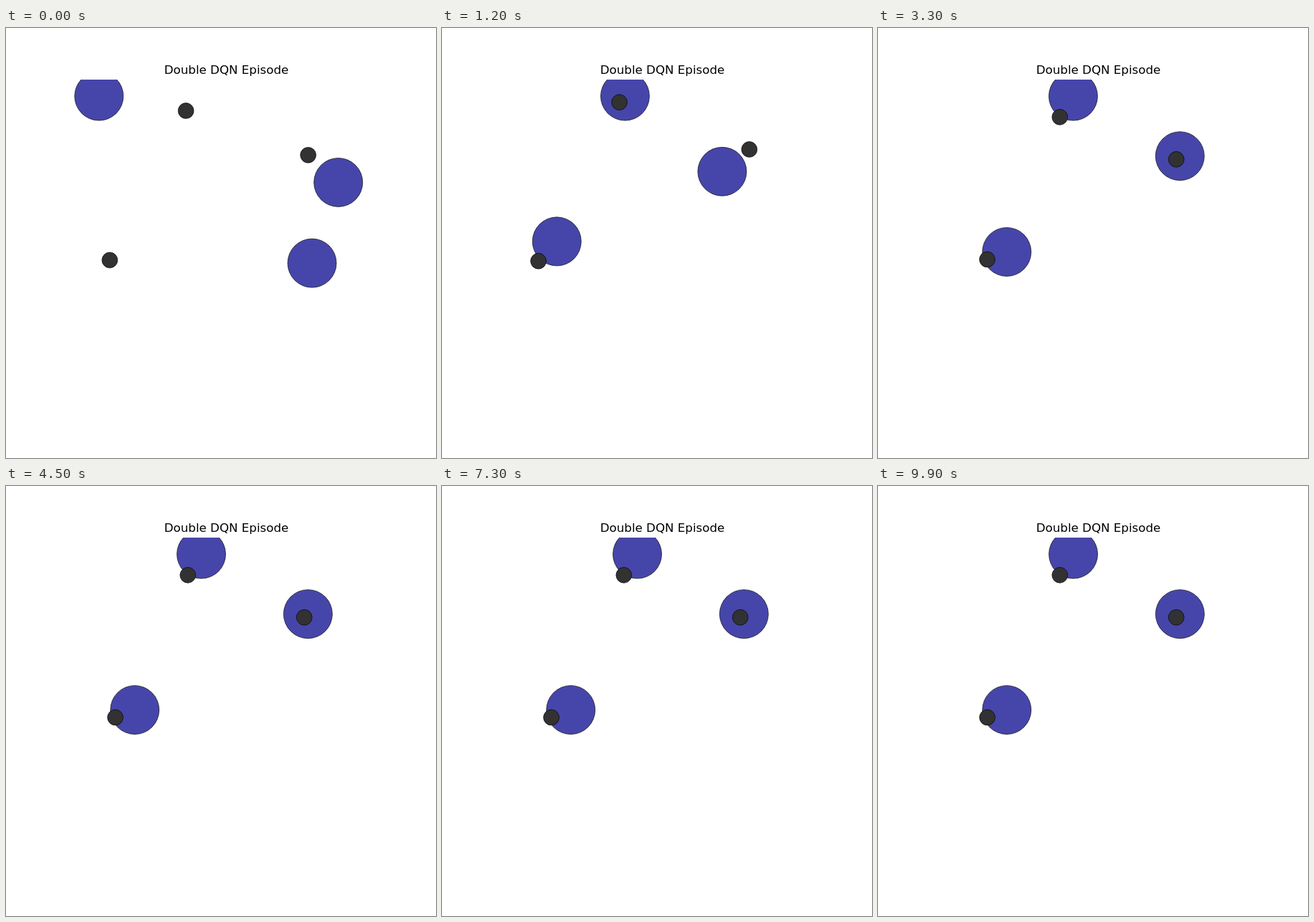
Animation, 600 px wide and 600 px high, one loop 10000 ms. Source, as an HTML page:

```html
<!DOCTYPE html>
<html lang="en">
<head>
<meta charset="utf-8">
<title>Double DQN Episode</title>
<style>
  html, body { margin: 0; width: 100%; height: 100%; overflow: hidden; background: #fff; }
  svg { display: block; width: 600px; height: 600px; }
  text { font: 16.67px "DejaVu Sans", sans-serif; text-anchor: middle; }
  circle { stroke: #000; stroke-width: .66px; }
  .agent { fill: #4646aa; }
  .landmark { fill: #323232; }
</style>
</head>
<body>
<svg viewBox="0 0 600 600">
  <clipPath id="view"><rect x="76.5" y="72" width="462" height="462"/></clipPath>
  <text x="307.5" y="64">Double DQN Episode</text>
  <g id="world" clip-path="url(#view)"></g>
</svg>
<script>
const STEPS = 100, STEP_MS = 100, DT = 0.1, DAMPING = 0.25, THRUST = 5;
const CENTER = { x: 307.5, y: 303 }, REACH = 207.9;
const MOVES = { L: [-1, 0], R: [1, 0], U: [0, -1], D: [0, 1], '.': [0, 0] };

// Each agent plays its opening, then repeats its final cycle.
const agents = [
  { x: -0.816, y: -0.9545, opening: 'DDDDRD', cycle: '.' },
  { x: 0.717, y: -0.402, opening: '.UULLLLLLU.R....', cycle: 'RL' },
  { x: 0.5487, y: 0.115, opening: 'U..UUL.L..RR', cycle: 'UD' }
];
const landmarks = [
  { x: -0.259, y: -0.861 },
  { x: 0.524, y: -0.577 },
  { x: -0.747, y: 0.096 }
];

function actionAt({ opening, cycle }, step) {
  return step < opening.length ? opening[step] : cycle[(step - opening.length) % cycle.length];
}

function simulate(agent) {
  let { x, y } = agent, vx = 0, vy = 0;
  return Array.from({ length: STEPS }, (_, step) => {
    const place = { x, y };
    const [ax, ay] = MOVES[actionAt(agent, step)];
    vx = vx * (1 - DAMPING) + ax * THRUST * DT;
    vy = vy * (1 - DAMPING) + ay * THRUST * DT;
    x += vx * DT;
    y += vy * DT;
    return place;
  });
}

function addCircle(kind, r) {
  const circle = document.createElementNS('http://www.w3.org/2000/svg', 'circle');
  circle.setAttribute('class', kind);
  circle.setAttribute('r', r);
  document.getElementById('world').append(circle);
  return circle;
}

const paths = agents.map(simulate);
const circles = [
  ...agents.map(() => addCircle('agent', 34)),
  ...landmarks.map(() => addCircle('landmark', 10.9))
];

function draw(step) {
  const places = [...paths.map(path => path[step]), ...landmarks];
  // The camera zooms so that the farthest coordinate stays in view.
  const scale = REACH / Math.max(...places.flatMap(p => [Math.abs(p.x), Math.abs(p.y)]));
  places.forEach((p, i) => {
    circles[i].setAttribute('cx', CENTER.x + p.x * scale);
    circles[i].setAttribute('cy', CENTER.y + p.y * scale);
  });
}

const start = performance.now();
function tick() {
  draw(Math.floor((performance.now() - start) / STEP_MS) % STEPS);
  requestAnimationFrame(tick);
}
tick();
</script>
</body>
</html>
```
